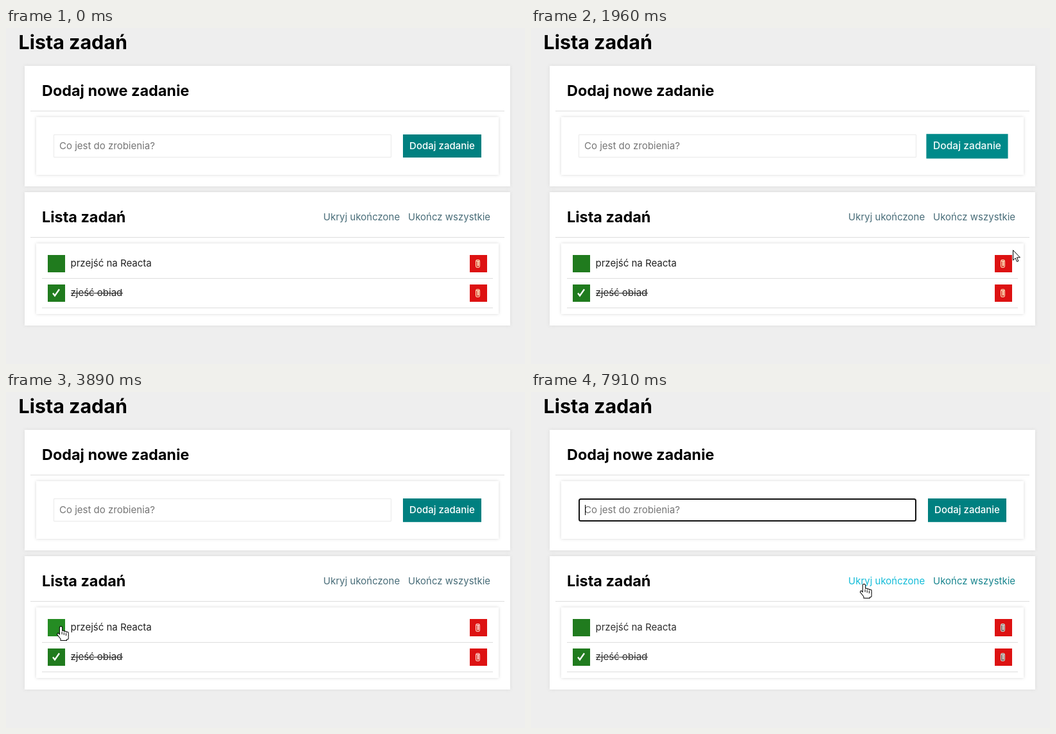
These frames come from a looping animation (808 by 524 pixels, 8000 ms). An HTML page with a canvas:

```html
<!DOCTYPE html>
<html lang="pl">
<head>
<meta charset="utf-8">
<title>Lista zadań</title>
<style>
  html, body { margin: 0; width: 100%; height: 100%; overflow: hidden; background: #eee; }
  canvas { display: block; width: 808px; height: 524px; }
</style>
</head>
<body>
<canvas id="stage" width="808" height="524"></canvas>
<script>
const ctx = document.getElementById('stage').getContext('2d');
const LOOP = 8000, FOCUS = 5875, BLINK = 500;
const BODY = 15, HEADING = 23.4, TITLE = 30.4;

// Pointer moves: start, end, then the points passed. It rests in between.
const moves = [
  [200, 1010, [712, 540], [597, 460], [544, 318], [535, 215], [585, 154], [655, 192]],
  [1540, 1960, [655, 192], [690, 235], [747, 335], [750, 346]],
  [2200, 2800, [750, 346], [745, 375], [735, 419]],
  [3065, 3380, [735, 419], [420, 464], [125, 430]],
  [3380, 3880, [125, 430], [85, 365]],
  [4355, 4700, [85, 365], [141, 190]],
  [5235, 5700, [141, 190], [107, 328], [153, 172]],
  [6875, 7590, [153, 172], [370, 240], [518, 299]]
];

const tasks = [
  { label: 'przejść na Reacta', done: false },
  { label: 'zjeść obiad', done: true }
];
const rowTop = i => 354 + 46 * i;

const area = {
  input: [74, 166, 526, 36],
  add: [618, 166, 122, 36],
  hide: [495, 286, 120, 18],
  finish: [626, 286, 126, 18]
};
tasks.forEach((task, i) => {
  area['check' + i] = [65, rowTop(i), 27, 27];
  area['bin' + i] = [722, rowTop(i), 27, 27];
});

const arrow = new Path2D('M.5 .5V16.2L4.1 12.8L6.6 18.4L8.8 17.4L6.4 11.9H11.4Z');
const beam = new Path2D('M-3-7.5H3M0-7V7M-3 7.5H3');
const hand = new Path2D('M-1.5 13L11 14L8.5 19V21H0V19L-5.5 12L-4.5 10.5Z');
for (let i = 0; i < 4; i++) hand.roundRect(3.2 * i - 1.6, i && 5.5 + i, 3.2, 14 - i, 1.5);

const clamp = v => Math.max(0, Math.min(1, v));
const smooth = u => u * u * (3 - 2 * u);
const blend = (a, b, k) => `rgb(${a.map((v, i) => Math.round(v + (b[i] - v) * k))})`;

// The CSS "ease" curve: cubic-bezier(.25, .1, .25, 1).
function ease(x) {
  const bezier = (u, a, b) => 3 * (1 - u) ** 2 * u * a + 3 * (1 - u) * u * u * b + u ** 3;
  let lo = 0, hi = 1;
  for (let i = 0; i < 18; i++) {
    const u = (lo + hi) / 2;
    if (bezier(u, .25, .25) < clamp(x)) lo = u; else hi = u;
  }
  return bezier(lo, .1, 1);
}

function hover(t, on, off, span) {
  return ease((Math.min(t, off) - on) / span) * (1 - ease((t - off) / span));
}

// Catmull-Rom curve through the points of the latest move.
function pointer(t) {
  const [start, end, ...pts] = moves.findLast(m => m[0] <= t) || moves[0];
  const s = smooth(clamp((t - start) / (end - start))) * (pts.length - 1);
  const i = Math.min(Math.floor(s), pts.length - 2), u = s - i;
  const at = n => pts[Math.max(0, Math.min(pts.length - 1, n))];
  return [0, 1].map(k => {
    const [a, b, c, d] = [-1, 0, 1, 2].map(n => at(i + n)[k]);
    return b + u / 2 * (c - a + u * (2 * a - 5 * b + 4 * c - d + u * (3 * (b - c) + d - a)));
  });
}

function rect(color, x, y, w, h) {
  ctx.fillStyle = color;
  ctx.fillRect(x, y, w, h);
}

function text(str, x, y, size, weight, color, align = 'left') {
  ctx.font = `${weight} ${size}px Inter, "Open Sans", sans-serif`;
  ctx.textAlign = align;
  ctx.fillStyle = color;
  ctx.fillText(str, x, y);
}

function card(x, y, w, h) {
  ctx.save();
  ctx.shadowColor = '#d8d8d8';
  ctx.shadowBlur = 5;
  rect('#fff', x, y, w, h);
  ctx.restore();
}

function section(title, y, h) {
  card(29, y, 756, h);
  text(title, 56, y + 47, HEADING, 700, '#000');
  rect('#ddd', 38, y + 70, 738, 1);
  card(47, y + 80, 720, h - 98);
}

function bin([x, y, w, h], hot, t) {
  const late = t >= FOCUS;
  const ink = late ? '#dcd4ce' : t < 3080 ? '#ffe3bd' : '#ffd0d0';
  rect(hot ? '#ee2020' : '#dd1212', x, y, w, h);
  ctx.beginPath();
  ctx.roundRect(x + 9.5, y + 7.5, 6, 12, 2);
  ctx.fillStyle = late ? '#85706a' : '#e0503f';
  ctx.fill();
  ctx.strokeStyle = ink;
  ctx.lineWidth = 1;
  ctx.stroke();
  rect(ink, x + 10, y + 9, 5, 1);
  rect(ink, x + 12, y + 10, 2, 7);
}

function row({ label, done }, i, over, t) {
  const y = rowTop(i), ink = t < FOCUS ? '#222' : '#303030';
  rect(over === 'check' + i ? '#258c23' : '#207b1e', ...area['check' + i]);
  text(label, 100.5, y + 18, BODY, 400, ink);
  if (done) {
    rect(ink, 101, y + 13, Math.round(ctx.measureText(label).width), 1);
    ctx.strokeStyle = '#fff';
    ctx.lineWidth = 2.3;
    ctx.stroke(new Path2D(`M73 ${y + 13.5}L76 ${y + 17.5}L83 ${y + 7.5}`));
  }
  bin(area['bin' + i], over === 'bin' + i, t);
  rect('#ddd', 56, y + 36, 702, 1);
}

function addButton(k) {
  const bottom = k ? 18.8 : 18;
  ctx.save();
  ctx.translate(679, 184);
  ctx.scale(1 + .1 * k, 1 + .1 * k);
  rect(blend([0, 128, 128], [0, 153, 153], k), -61, -18, 122, 18 + bottom);
  text('Dodaj zadanie', 0, 4.5, BODY, 500, blend([255, 255, 255], [228, 245, 245], k), 'center');
  ctx.restore();
}

function inputField(t) {
  const focused = t >= FOCUS, inset = focused ? 1 : .5;
  const [x, y, w, h] = area.input;
  ctx.strokeStyle = focused ? '#101010' : '#e9e9e9';
  ctx.lineWidth = 2 * inset;
  ctx.beginPath();
  ctx.roundRect(x + inset, y + inset, w - 2 * inset, h - 2 * inset, focused ? 2.5 : 0);
  ctx.stroke();
  text('Co jest do zrobienia?', 83, 189, BODY, 400, '#757575');
  if (focused && Math.floor((t - FOCUS) / BLINK) % 2 === 0) rect('#000', 84, 176, 1, 16);
}

function cursor(x, y, over) {
  ctx.save();
  ctx.lineWidth = 1;
  ctx.strokeStyle = '#000';
  ctx.fillStyle = '#fff';
  ctx.translate(Math.round(x), Math.round(y));
  if (over === 'input') {
    ctx.translate(.5, 0);
    ctx.stroke(beam);
  } else if (over) {
    ctx.translate(.5, 1);
    ctx.lineWidth = 2;
    ctx.stroke(hand);
    ctx.fill(hand);
    for (let i = 1; i < 4; i++) rect('#000', 3.2 * i - 2.1, 7 + i, 1, 4);
  } else {
    ctx.fill(arrow);
    ctx.stroke(arrow);
  }
  ctx.restore();
}

function draw(t) {
  const [x, y] = pointer(t);
  const over = Object.keys(area).find(name => {
    const [ax, ay, w, h] = area[name];
    return x >= ax && x < ax + w && y >= ay && y < ay + h;
  });

  rect('#eee', 0, 0, 808, 524);
  text('Lista zadań', 19.5, 33, TITLE, 700, '#000');

  section('Dodaj nowe zadanie', 59, 188);
  inputField(t);
  addButton(hover(t, 815, 1630, 1000));

  section('Lista zadań', 256, 208);
  const link = t < FOCUS ? [72, 108, 120] : [24, 133, 142];
  const glow = hover(t, 7490, LOOP, 420);
  text('Ukryj ukończone', 494, 300, BODY, 400, blend(link, [20, 188, 216], glow));
  text('Ukończ wszystkie', 626, 300, BODY, 400, blend(link, link, 0));
  tasks.forEach((task, i) => row(task, i, over, t));

  cursor(x, y, over);
}

function tick() {
  draw(performance.now() % LOOP);
  requestAnimationFrame(tick);
}
tick();
</script>
</body>
</html>
```
